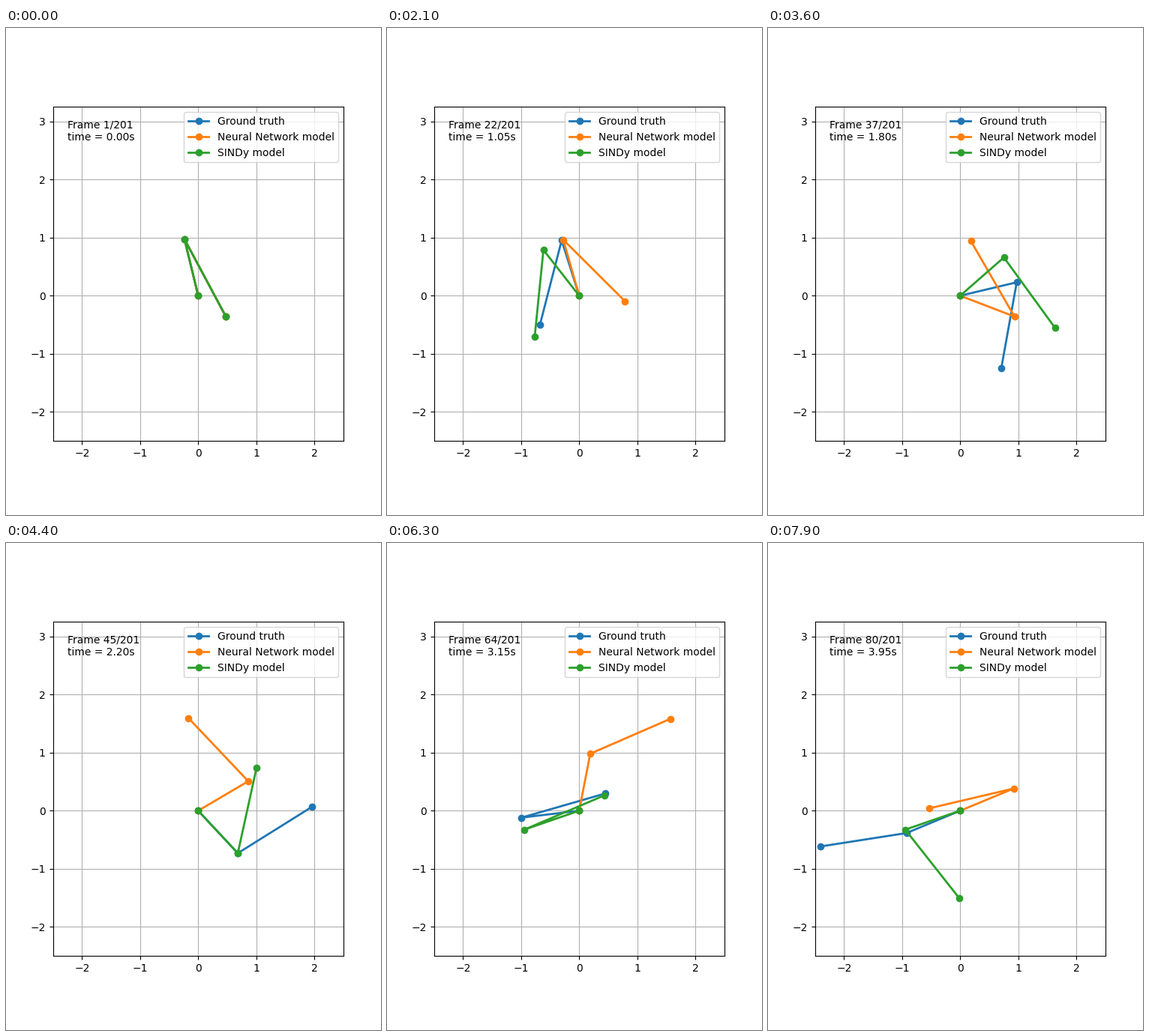
A matplotlib script that plays this animation: 500 by 650 pixels, repeating every 8 s.

```python
import numpy as np
import matplotlib.pyplot as plt
from matplotlib.animation import FuncAnimation

# Double pendulum: three models share a start pose and drift apart.
# Each swing follows the equations of motion from one key pose to the next.
G, L1, L2 = 9.81, 1.0, 1.5
DT, SUB, FRAMES = 0.05, 3, 80

KEYS = [0, 12, 29, 44, 56, 70, 79]
START = (-2.904, 0.491)
MODELS = {
    "Ground truth": [START, (1.046, -0.341), (-0.33, -1.088), (0.75, 2.13),
                     (0.07, 2.835), (-1.956, 0.876), (-1.176, -1.416)],
    "Neural Network model": [START, (1.052, -0.3), (-1.06, 2.326), (2.103, -2.384),
                             (2.074, 2.204), (-2.7, 1.38), (1.964, -1.34)],
    "SINDy model": [START, (1.121, -0.39), (0.422, -1.196), (0.75, 2.926),
                    (-0.145, -0.307), (-1.17, -2.402), (-1.239, 0.667)],
}
PUSH = (6.0, 0.0)  # rough start velocity


def wrap(a):
    return (a + np.pi) % (2 * np.pi) - np.pi


def deriv(s, mu):
    a1, a2, w1, w2 = s
    sd, cd = np.sin(a1 - a2), np.cos(a1 - a2)
    pull = sd * w1 * w1 - G * np.sin(a2)
    acc1 = (-mu * L2 * sd * w2 * w2 - G * np.sin(a1) - mu * cd * pull) / (1 - mu * cd * cd)
    return np.array([w1, w2, acc1, (pull - cd * acc1) / L2])


def swing(pose, vel, n, mu):
    """Integrate a batch of start velocities (2, N); returns (n + 1, 4, N)."""
    s = np.vstack([np.repeat(np.array(pose)[:, None], vel.shape[1], axis=1), vel])
    path, h = [s], DT / SUB
    for _ in range(n):
        for _ in range(SUB):
            k1 = deriv(s, mu)
            k2 = deriv(s + h / 2 * k1, mu)
            k3 = deriv(s + h / 2 * k2, mu)
            k4 = deriv(s + h * k3, mu)
            s = s + h / 6 * (k1 + 2 * k2 + 2 * k3 + k4)
        path.append(s)
    return np.array(path)


def shoot(pose, goal, guess, n, mu):
    """Find the start velocity nearest to guess that carries pose to goal."""
    guess, goal = np.array(guess)[:, None], np.array(goal)[:, None]

    def miss(v):
        return wrap(swing(pose, v, n, mu)[-1, :2] - goal)

    def cost(v, weight):
        return weight * np.hypot(*miss(v)) + np.hypot(*(v - guess))

    grid = np.linspace(-5, 5, 25)
    v = guess + np.array(np.meshgrid(grid, grid)).reshape(2, -1)
    v = v[:, np.argsort(cost(v, 7))[:48]]

    # Newton steps on the whole batch
    h = 1e-4
    for _ in range(7):
        batch = np.hstack([v, v + [[h], [0]], v + [[0], [h]]])
        e, ex, ey = np.split(miss(batch), 3, axis=1)
        jx, jy = wrap(ex - e) / h, wrap(ey - e) / h
        det = jx[0] * jy[1] - jx[1] * jy[0]
        det = np.where(np.abs(det) < 1e-9, 1e-9, det)
        step = np.array([jy[1] * e[0] - jy[0] * e[1], jx[0] * e[1] - jx[1] * e[0]]) / det
        v = v - np.clip(step, -1, 1)

    total = cost(v, 100)
    best = np.argmin(total)
    return swing(pose, v[:, [best]], n, mu)[:, :, 0], total[best]


def solve(poses, guess, mu):
    """Chain the swings; returns angles per frame, start velocity and strain."""
    trail, strain, vel0 = [], 0.0, None
    for pose, goal, n in zip(poses, poses[1:], np.diff(KEYS)):
        path, kink = shoot(pose, goal, guess, n, mu)
        if vel0 is None:
            vel0 = path[0, 2:]
        else:
            strain += kink
        guess = path[-1, 2:]
        rest = wrap(np.array(goal) - path[-1, :2])
        angles = path[:, :2] + np.linspace(0, 1, n + 1)[:, None] * rest
        trail.extend(angles[:-1])
    trail.append(angles[-1])
    return np.array(trail), vel0, strain


# The mass share of the outer bob is the one that needs the fewest kinks.
truth = MODELS["Ground truth"]
mu = min(np.linspace(0.35, 0.65, 7), key=lambda m: solve(truth[:4], PUSH, m)[2])
vel0 = solve(truth[:2], PUSH, mu)[1]
trails = [solve(poses, vel0, mu)[0] for poses in MODELS.values()]

fig, ax = plt.subplots(figsize=(5, 6.5), dpi=100)
ax.set_aspect("equal")
ax.set_xlim(-2.5, 2.5)
ax.set_ylim(-2.5, 3.25)
ax.grid()
arms = [ax.plot([], [], "o-", lw=2, label=name)[0] for name in MODELS]
label = ax.text(0.05, 0.9, "", transform=ax.transAxes)
ax.legend(loc="upper right")


def draw(i):
    for arm, trail in zip(arms, trails):
        a1, a2 = trail[i]
        arm.set_data(np.cumsum([0, L1 * np.sin(a1), L2 * np.sin(a2)]),
                     np.cumsum([0, -L1 * np.cos(a1), -L2 * np.cos(a2)]))
    label.set_text(f"Frame {i + 1}/201\ntime = {i * DT:.2f}s")
    return [*arms, label]


anim = FuncAnimation(fig, draw, frames=FRAMES, interval=100, repeat=True, repeat_delay=0)
plt.show()
```
